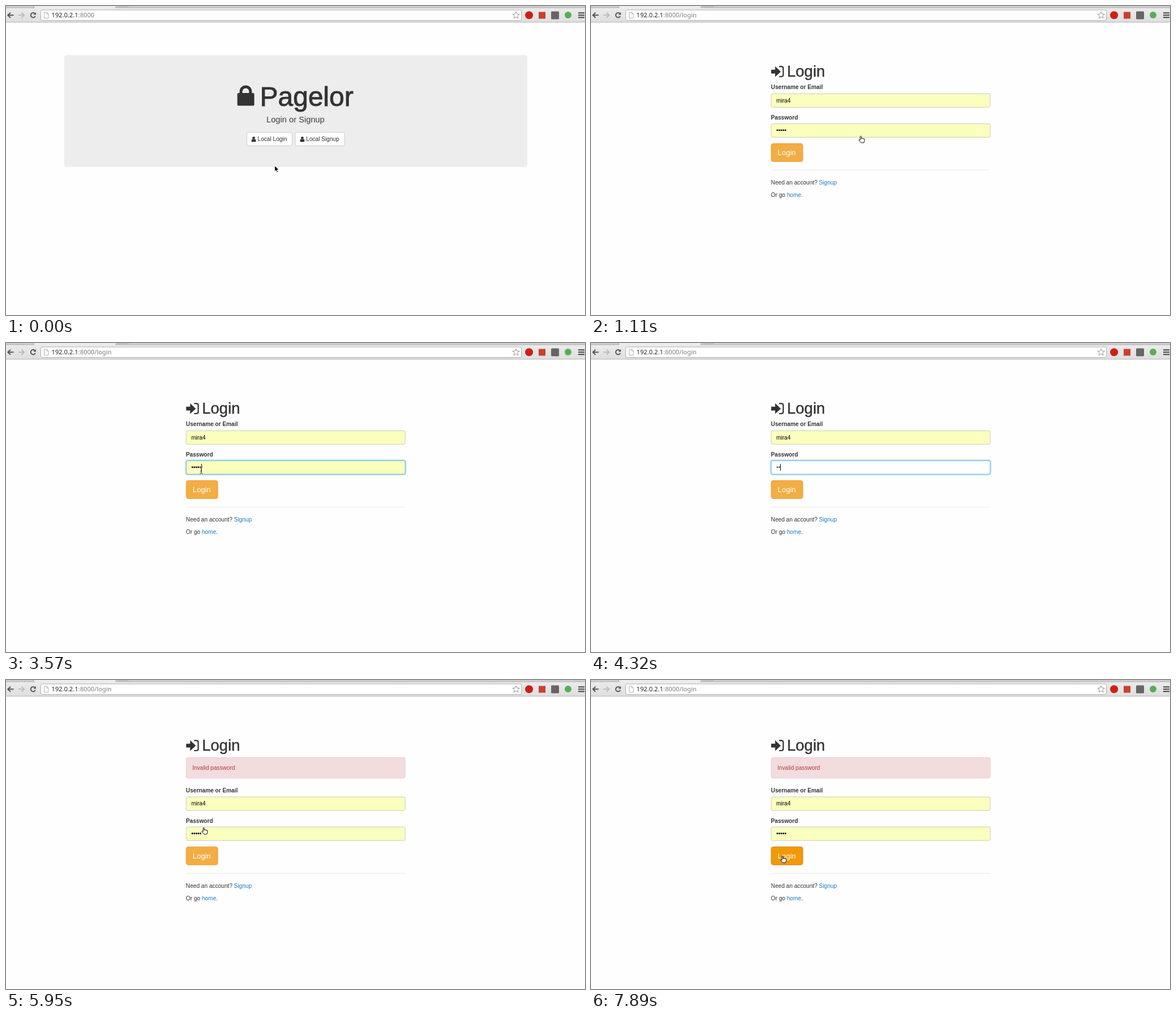
These frames come from a looping animation (1025x547 px, 8000 ms). An HTML page:

```html
<!DOCTYPE html>
<html lang="en">
<head>
<meta charset="utf-8">
<title>Login demo</title>
<style>
html, body { margin: 0; width: 100%; height: 100%; overflow: hidden; background: #fefefe; }
svg { display: block; width: 100%; height: 100%; }
text { font-family: "Liberation Sans", Arial, sans-serif; font-size: 10.15px; fill: #333; white-space: pre; }
.url { font-family: "Noto Sans", "Open Sans", sans-serif; font-size: 11.2px; fill: #222; }
.dim { fill: #808080; }
.bold { font-weight: bold; }
.title { font-size: 48px; stroke: #333; stroke-width: .9px; }
.head { font-size: 27.5px; stroke: #333; stroke-width: .4px; }
.lead { font-size: 14.7px; fill: #3c3c3c; }
.link { fill: #1f78c4; }
.btn { fill: #fff; stroke: #ccc; }
.btn.hot { fill: #e9e9e9; stroke: #adadad; }
.go { fill: #f2ad45; stroke: #eea236; }
.go.hot { fill: #ef9a06; stroke: #d58512; }
.field { fill: #faffbd; stroke: #c9cbc0; }
.field.focus { stroke: #5aaee8; }
.field.typed { fill: #fff; }
.val { fill: #000; }
</style>
</head>
<body>
<svg viewBox="0 0 1025 547" preserveAspectRatio="none">
  <defs>
    <linearGradient id="bar" x2="0" y2="1">
      <stop offset="0" stop-color="#ededed"/><stop offset="1" stop-color="#dedede"/>
    </linearGradient>
    <g id="person" fill="#333">
      <circle cx="4" cy="2.6" r="2.4"/>
      <path d="M0 8.2C0 5.6 1 4.5 2 4.4Q4 6 6 4.4C7 4.5 8 5.6 8 8.2Q8 9.4 6.8 9.4H1.2Q0 9.4 0 8.2z"/>
    </g>
  </defs>

  <rect width="1025" height="547" fill="#fefefe"/>

  <!-- browser bar -->
  <g>
    <rect width="1025" height="29" fill="url(#bar)"/>
    <path d="M0 0H49L51 3H0zM195 0H1025V3H193z" fill="#d0d0d0"/>
    <path d="M0 3H50L48 0M196 0L194 3H1025" fill="none" stroke="#a9a9a9"/>
    <path d="M198 0L200 1H216L217 0" fill="#e4e4e4" stroke="#999" stroke-width=".8"/>
    <path d="M0 28.7H1025" stroke="#b4b4b4"/>
    <rect x="61.5" y="7" width="851" height="18.5" rx="2.5" fill="#fff" stroke="#b0b0b0"/>
    <g fill="none" stroke-width="2">
      <path d="M13.5 16.3H4M8 11.8L3.3 16.3L8 20.8" stroke="#555"/>
      <path d="M22 16.3H31.5M27.5 11.8L32.2 16.3L27.5 20.8" stroke="#bdbdbd"/>
      <path d="M51.3 13.6A4.2 4.2 0 1 0 51.9 17.8" stroke="#555"/>
    </g>
    <path d="M53 11V15.6H48.4z" fill="#555"/>
    <path d="M67.5 11H72L75 14V21.5H67.5zM72 11V14H75" fill="#fff" stroke="#aaa" stroke-width=".9"/>
    <text class="url" x="80.5" y="20">192.0.2.1<tspan class="dim">:8000<tspan id="path"></tspan></tspan></text>
    <path d="M903 10L904.8 14.2L909.2 14.5L905.8 17.4L906.9 21.8L903 19.4L899.1 21.8L900.2 17.4L896.8 14.5L901.2 14.2z" fill="#fff" stroke="#8a8a8a" stroke-width=".9"/>
    <circle cx="926" cy="16.3" r="7" fill="#cb2114"/>
    <rect x="943" y="10.5" width="12" height="12" fill="#c9402f"/>
    <rect x="965" y="9.5" width="14" height="14" rx="1.5" fill="#666"/>
    <circle cx="995" cy="16" r="6" fill="#55b055"/>
    <path d="M1013 12.2H1024M1013 16.2H1024M1013 20.2H1024" stroke="#444" stroke-width="2"/>
  </g>

  <g id="home">
    <rect x="103" y="87" width="820" height="198" rx="4.5" fill="#ededed"/>
    <rect x="409.5" y="154" width="30" height="22.5" rx="2.6" fill="#333"/>
    <path d="M416 155V151.3a8.4 8.4 0 0 1 16.8 0V155" fill="none" stroke="#333" stroke-width="5"/>
    <text class="title" x="449.5" y="176.5">Pagelor</text>
    <text class="lead" x="461" y="206">Login or Signup</text>
    <rect id="local" class="btn" x="426.5" y="223.5" width="80" height="24" rx="2.5"/>
    <rect class="btn" x="512" y="223.5" width="87.5" height="24" rx="2.5"/>
    <use href="#person" x="434.5" y="231"/>
    <use href="#person" x="520.5" y="231"/>
    <text x="445.5" y="239">Local Login</text>
    <text x="531.3" y="239">Local Signup</text>
  </g>

  <g id="login">
    <path d="M319 112.8H326V106.8L336 116.2L326 125.6V119.6H319z" fill="#333"/>
    <path d="M333 107.2H337Q340.3 107.2 340.3 110.5V121.8Q340.3 125 337 125H333" fill="none" stroke="#333" stroke-width="2.2"/>
    <text class="head" x="347" y="125.3">Login</text>
    <g id="alert">
      <rect x="319" y="137.3" width="387.7" height="36.5" rx="2.8" fill="#f2dcdd" stroke="#ebccd1"/>
      <text x="330" y="159" style="fill:#b53a39">Invalid password</text>
    </g>
    <g id="form">
      <text class="bold" x="318.6" y="147.4">Username or Email</text>
      <rect class="field" x="319" y="155.2" width="387.7" height="24" rx="2.6"/>
      <text class="val" x="328" y="170.6">mira4</text>
      <text class="bold" x="318.6" y="200.8">Password</text>
      <rect id="ring" x="318.6" y="207.8" width="388.4" height="24.8" rx="3.2" fill="none" stroke="#66afe9" stroke-width="3.6"/>
      <rect id="pass" class="field" x="319" y="208.3" width="387.7" height="24" rx="2.6"/>
      <g id="dots"></g>
      <rect id="caret" y="214" width="1" height="12"/>
      <rect id="go" class="go" x="319" y="243.5" width="56" height="32" rx="3.8"/>
      <text x="330.6" y="264" style="fill:#fff;font-size:13.1px">Login</text>
      <path d="M319 290.5H707" stroke="#ececec"/>
      <text x="318.6" y="316">Need an account? <tspan class="link">Signup</tspan></text>
      <text x="318.6" y="337.8">Or go <tspan class="link">home</tspan>.</text>
    </g>
  </g>

  <g id="arrow">
    <path d="M0 0V10.3L2.4 8.1L4.1 12L6 11.2L4.3 7.4H7.6z" stroke="#fff" stroke-width=".9"/>
  </g>
  <g id="hand">
    <path transform="translate(-5 -6)" d="M2.5 7.5V1.4a1 1 0 0 1 2 0V5a.95.95 0 0 1 1.9.1a.95.95 0 0 1 1.9.3a.95.95 0 0 1 1.8.6V8.6L9 12H4.2L.7 8C-.2 6.8 1 6 1.8 6.8z" fill="#fff" stroke="#000" stroke-width=".95"/>
  </g>
  <g id="beam" fill="none">
    <path d="M-2.6 -6Q0 -6 0 -4.6Q0 -6 2.6 -6M0 -4.6V4.6M-2.6 6Q0 6 0 4.6Q0 6 2.6 6M-1.4 2H1.4" stroke="#fff" stroke-width="2" opacity=".6"/>
    <path d="M-2.6 -6Q0 -6 0 -4.6Q0 -6 2.6 -6M0 -4.6V4.6M-2.6 6Q0 6 0 4.6Q0 6 2.6 6M-1.4 2H1.4" stroke="#222" stroke-width=".95"/>
  </g>
</svg>

<script>
const LOOP = 8000, PITCH = 3.57, SHIFT = 51.8;
const $ = id => document.getElementById(id);
const show = (id, on) => { $(id).style.display = on ? "" : "none"; };

// time, pointer kind, x, y, interface changes
const steps = [
  [0, "arrow", 475.6, 282.6, { page: "home", hot: 0, dots: 5, caret: 0, ring: 0, typed: 0, alert: 0 }],
  [150, "hand", 479, 241, { hot: 1 }],
  [360, "hand", 479, 236],
  [1110, "hand", 479, 236, { page: "login", hot: 0 }],
  [1590, "beam", 460, 224],
  [1740, "arrow", 424, 202],
  [1890, "arrow", 391, 186],
  [2040, "beam", 371, 178],
  [2190, "beam", 365, 176.5],
  [2490, "beam", 364.3, 172.5],
  [2790, "beam", 362, 175],
  [2940, "arrow", 351, 198],
  [3090, "beam", 342.5, 228],
  [3390, "beam", 345.6, 225, { ring: .5, caret: 1 }],
  [3570, "beam", 345.6, 225, { ring: 1 }],
  [3870, "", 0, 0, { typed: 1, dots: 4 }],
  [4170, "", 0, 0, { dots: 3 }],
  [4320, "", 0, 0, { dots: 2 }],
  [4760, "", 0, 0, { caret: 0 }],
  [5060, "beam", 346, 226],
  [5210, "hand", 349.5, 278, { hot: 1 }],
  [5360, "hand", 350.5, 271, { caret: 1 }],
  [5510, "hand", 351.5, 267],
  [5800, "hand", 351.5, 267, { ring: 0, caret: 0 }],
  [5950, "hand", 351.5, 267, { hot: 0, dots: 5, typed: 0, alert: 1 }],
  [6250, "beam", 354, 261],
  [6400, "beam", 362, 224],
  [6550, "arrow", 373, 192],
  [6700, "arrow", 382, 167],
  [6850, "beam", 389, 157],
  [7000, "beam", 384, 158],
  [7150, "arrow", 369, 171],
  [7300, "beam", 361, 217],
  [7450, "beam", 352, 265.5],
  [7740, "hand", 344, 308, { hot: 1 }],
  [7890, "hand", 340.5, 317.5]
];

let ui = {};
const states = steps.map(([at, kind, x, y, change]) => {
  ui = { ...ui, ...change };
  return { ...ui, at, kind, x, y };
});

for (let i = 0; i < 5; i++) {
  const dot = document.createElementNS("http://www.w3.org/2000/svg", "circle");
  dot.setAttribute("cx", 329.9 + PITCH * i);
  dot.setAttribute("cy", 219.9);
  dot.setAttribute("r", 1.45);
  $("dots").append(dot);
}

function draw(s) {
  const onLogin = s.page === "login";
  show("home", !onLogin);
  show("login", onLogin);
  show("alert", s.alert);
  show("caret", s.caret);
  $("path").textContent = onLogin ? "/login" : "";
  $("form").setAttribute("transform", `translate(0 ${s.alert ? SHIFT : 0})`);
  $("local").classList.toggle("hot", !!s.hot);
  $("go").classList.toggle("hot", !!s.hot);
  $("pass").classList.toggle("focus", s.ring > 0);
  $("pass").classList.toggle("typed", !!s.typed);
  $("ring").setAttribute("opacity", s.ring * .35);
  $("dots").setAttribute("fill", s.typed ? "#555" : "#000");
  [...$("dots").children].forEach((dot, i) => { dot.style.display = i < s.dots ? "" : "none"; });
  $("caret").setAttribute("x", 327.8 + PITCH * s.dots);
  for (const kind of ["arrow", "hand", "beam"]) show(kind, s.kind === kind);
  if (s.kind) $(s.kind).setAttribute("transform", `translate(${s.x} ${s.y})`);
}

const start = performance.now();
let last = null;
function tick() {
  const t = (performance.now() - start) % LOOP;
  const now = states.findLast(s => s.at <= t) || states[0];
  if (now !== last) draw(last = now);
  requestAnimationFrame(tick);
}
tick();
</script>
</body>
</html>
```
